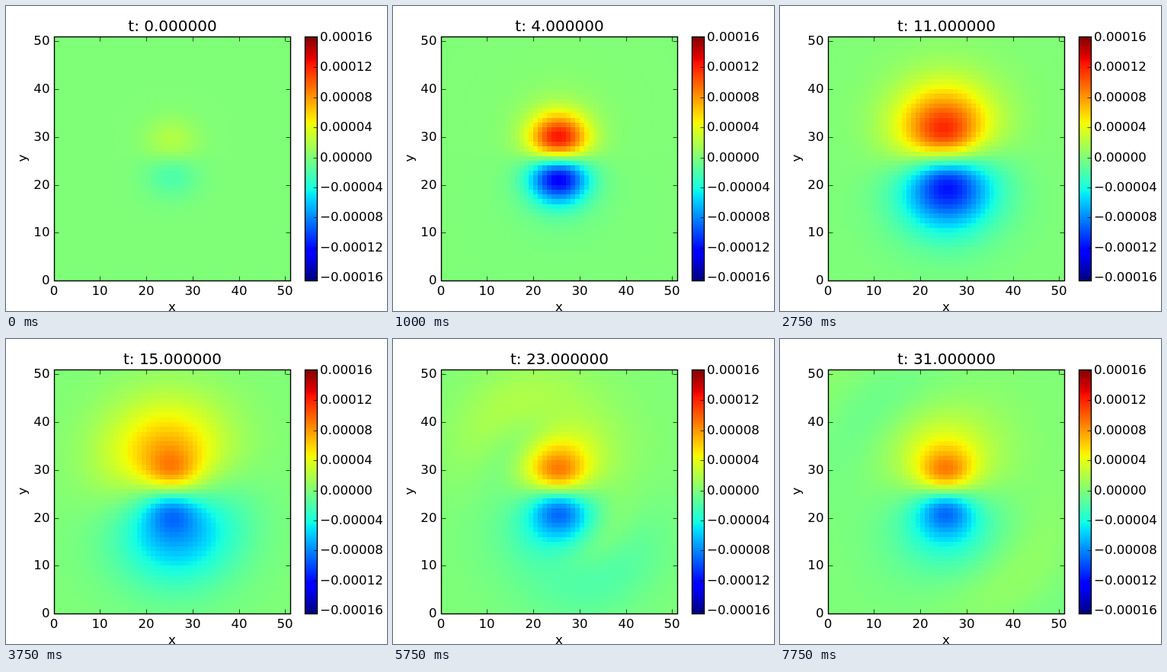
Animation of 500 by 400 pixels, one loop 8 s. Source, as an HTML page with a canvas:

```html
<!DOCTYPE html>
<html lang="en">
<head>
<meta charset="utf-8">
<title>Dipole field</title>
<style>
  html, body { margin: 0; width: 100%; height: 100%; overflow: hidden; background: #fff; }
  canvas, svg { position: absolute; left: 0; top: 0; }
  text { font: 16.67px "DejaVu Sans", sans-serif; fill: #000; }
  #title { font-size: 20px; }
  .frame { fill: none; stroke: #000; stroke-width: 1.39; }
  .tick { stroke: #000; stroke-width: 0.7; }
</style>
</head>
<body>
<canvas id="field" width="500" height="400"></canvas>
<svg id="axes" width="500" height="400" viewBox="0 0 500 400">
  <rect class="frame" x="63.5" y="40.5" width="310" height="320"/>
  <rect class="frame" x="392.5" y="40.5" width="16" height="320"/>
  <text id="title" x="218.5" y="33" text-anchor="middle"></text>
  <text x="218" y="400" text-anchor="middle">x</text>
  <text transform="translate(27 199.5) rotate(-90)" text-anchor="middle">y</text>
</svg>
<script>
const N = 51, LEFT = 62.5, TOP = 40, W = 310, H = 320;
const VMIN = -16.4, VMAX = 16.1;            // units of 1e-5
const STEP_MS = 250, STEPS = 32;
const ctx = document.getElementById('field').getContext('2d');
const axes = document.getElementById('axes');
const title = document.getElementById('title');

// time, core, front amplitude, front radius, sharpness, tilt (deg), focus, wake amplitude, wake radius
const KEYS = [
  [0,  0,   2,    4,   1,   0,  1, 0,   4],
  [4,  1.5, 11,   4.5, 1,   0,  1, 0,   4],
  [7,  4,   11.8, 5.4, 1,   2,  1, 0,   4],
  [11, 6,   6.6,  8,   1.3, 7,  1, 0,   4],
  [15, 7.8, 3.2,  12,  2,   17, 1, 0,   6],
  [23, 9,   1.3,  21,  7,   32, 3, 2,   13.5],
  [31, 9,   0.8,  32,  10,  38, 3, 1.5, 24]
];
const WAKE_TILT = 38;

function stateAt(t) {
  const i = Math.max(1, KEYS.findIndex(k => k[0] >= t));
  const a = KEYS[i - 1], b = KEYS[i];
  const p = (t - a[0]) / (b[0] - a[0]);
  return a.map((v, j) => v + (b[j] - v) * p);
}

const vortex = r => (1 - Math.exp(-r * r / 23)) / r * Math.exp(-r * r / 324);
const CORE_PEAK = vortex(5);
const ring = (r, r0, p) => Math.pow(r / r0, p) * Math.exp(p / 2 * (1 - r * r / (r0 * r0)));
function lobe(angle, tilt, focus) {
  const s = Math.sin(angle - tilt * Math.PI / 180);
  return Math.sign(s) * Math.pow(Math.abs(s), focus);
}

function value(x, y, s) {
  const r = Math.hypot(x, y);
  if (!r) return 0;
  const [, core, front, r0, sharp, tilt, focus, wake, r1] = s;
  const a = Math.atan2(y, x);
  return core * vortex(r) / CORE_PEAK * Math.sin(a)
    + front * ring(r, r0, sharp) * lobe(a, tilt, focus)
    - wake * ring(r, r1, 8) * lobe(a, WAKE_TILT, 3);
}

const clamp = v => Math.max(0, Math.min(1, v));
function jet(v) {
  const n = clamp((v - VMIN) / (VMAX - VMIN));
  const r = Math.min(clamp((n - 0.35) / 0.31), 1 - 0.5 * clamp((n - 0.89) / 0.11));
  const g = Math.min(clamp((n - 0.125) / 0.25), 1 - clamp((n - 0.64) / 0.27));
  const b = Math.min(0.5 + 0.5 * clamp(n / 0.11), 1 - clamp((n - 0.34) / 0.31));
  return `rgb(${[r, g, b].map(c => Math.round(c * 255))})`;
}

function drawField(t) {
  const s = stateAt(t), mid = (N - 1) / 2;
  const ex = i => Math.round(LEFT + i * W / N);
  const ey = j => Math.round(TOP + j * H / N);
  for (let j = 0; j < N; j++) {
    for (let i = 0; i < N; i++) {
      ctx.fillStyle = jet(value(i - mid, mid - j, s));
      ctx.fillRect(ex(i), ey(j), ex(i + 1) - ex(i), ey(j + 1) - ey(j));
    }
  }
}

function add(tag, attrs, text = '') {
  const el = document.createElementNS(axes.namespaceURI, tag);
  for (const k in attrs) el.setAttribute(k, attrs[k]);
  el.textContent = text;
  axes.append(el);
}
const snap = v => Math.round(v) + 0.5;
const tick = (x, y, dx, dy) => add('line', { class: 'tick', x1: x, y1: y, x2: x + dx, y2: y + dy });
const label = (x, y, anchor, text) => add('text', { x, y, 'text-anchor': anchor }, text);

function drawAxes() {
  const right = snap(LEFT + W), bottom = snap(TOP + H);
  for (let v = 0; v <= 50; v += 10) {
    const x = snap(LEFT + v * W / N), y = snap(TOP + H - v * H / N);
    tick(x, bottom, 0, -6);
    tick(x, snap(TOP), 0, 6);
    tick(snap(LEFT), y, 6, 0);
    tick(right, y, -6, 0);
    label(x - 0.5, 379, 'middle', v);
    label(57.5, y + 4.5, 'end', v);
  }
  for (let v = -16; v <= 16; v += 4) {
    const y = snap(TOP + (VMAX - v) / (VMAX - VMIN) * H);
    tick(408.5, y, -5, 0);
    label(412, y + 4.5, 'start', (v / 1e5).toFixed(5).replace('-', '\u2212'));
  }
  for (let y = 0; y < H; y++) {
    ctx.fillStyle = jet(VMAX - (y + 0.5) / H * (VMAX - VMIN));
    ctx.fillRect(392, TOP + y, 16, 1);
  }
}

let shown = -1;
function tickFrame() {
  const t = Math.floor(performance.now() / STEP_MS) % STEPS;
  if (t !== shown) {
    shown = t;
    drawField(t);
    title.textContent = 't: ' + t.toFixed(6);
  }
  requestAnimationFrame(tickFrame);
}

drawAxes();
tickFrame();
</script>
</body>
</html>
```
